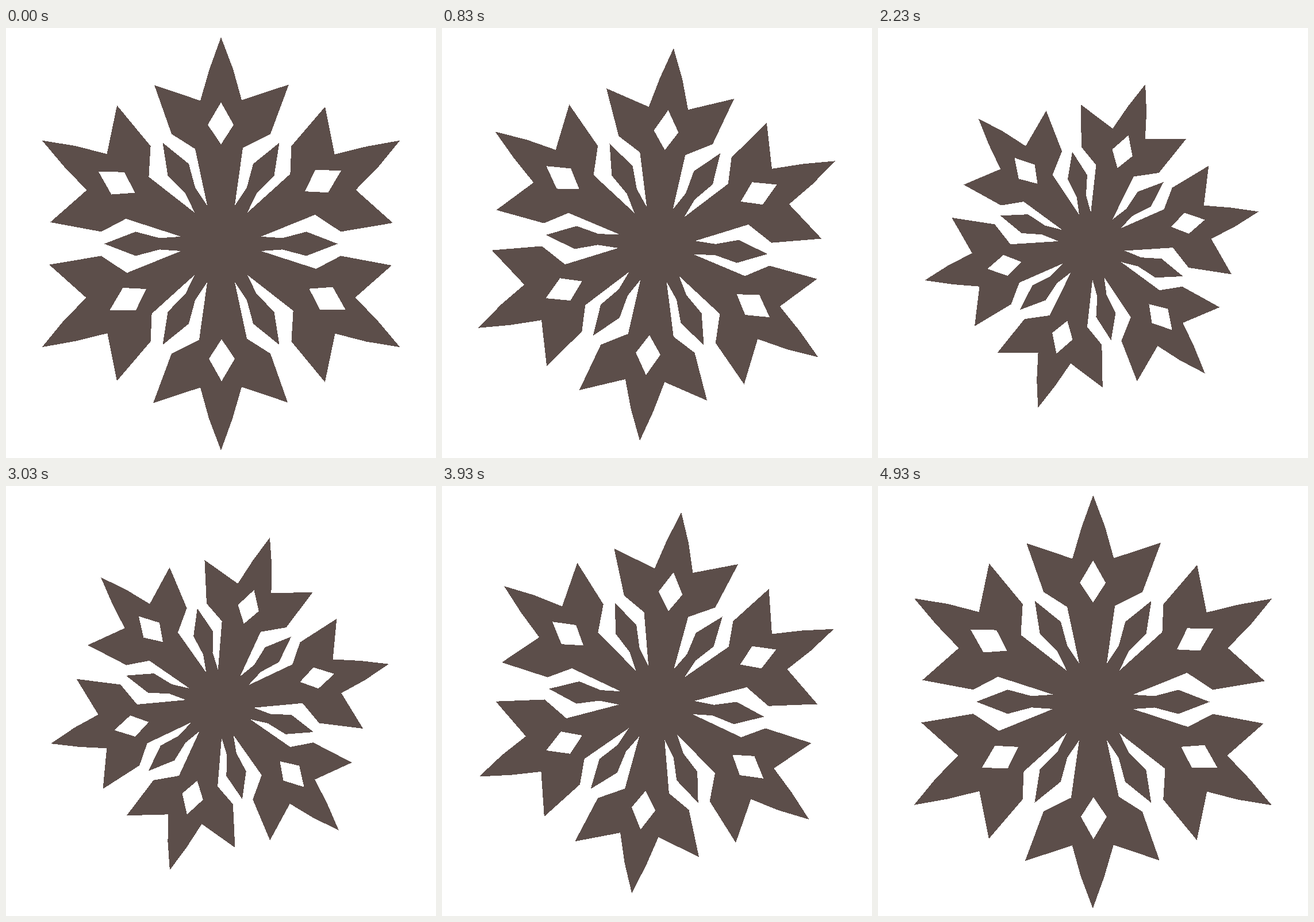
Write an HTML page that moves like this. It is 748 px wide and 748 px high and loops after 5.01 s.

```html
<!DOCTYPE html>
<html lang="en">
<head>
<meta charset="utf-8">
<title>Snowflake</title>
<style>
html, body { margin: 0; width: 100%; height: 100%; overflow: hidden; background: #fff; }
svg { display: block; width: 100%; height: 100%; }
</style>
</head>
<body>
<svg viewBox="0 0 748 748" shape-rendering="crispEdges">
  <g id="flake">
    <path id="body" fill="#5c4e4a"/>
    <path id="holes" fill="#fff"/>
  </g>
</svg>
<script>
const LOOP = 5010, CYCLE = 5000;
const TURN = 18.97, SHRINK = 0.181;
const CENTER = [374, 375.4], PIVOT = [361, 377.3];
const HUB = 70;
const el = id => document.getElementById(id);

// Points are [across, outward] from the centre, with the shape pointing up.
const arm = [
  [-21, 50], [-24, 67], [-45, 165], [-86, 191], [-116, 276], [-36, 249], [-20, 304], [0, 359.5],
  [21, 304], [36, 250], [118, 277], [86, 191], [38, 167], [24, 67], [21, 50]
];
const side = [[12.5, 55], [12.5, 70], [10, 107], [21, 148.5]];
const petal = [...side.map(([w, r]) => [-w, r]), [0, 203], ...side.slice().reverse()];
const kite = [[0, 245], [22, 206], [0, 172], [-23, 206]];
// The cut-outs sit slightly off the arm axes.
const nudge = [[0, 1], [-6, 0], [-9, 0], [-1, -6], [-3, -20], [2, 2]];

function polygon(points, degrees) {
  const a = degrees * Math.PI / 180, c = Math.cos(a), s = Math.sin(a);
  const place = ([w, r]) =>
    `${(CENTER[0] + w * c + r * s).toFixed(2)},${(CENTER[1] + w * s - r * c).toFixed(2)}`;
  return `M${points.map(place).join(" ")}Z`;
}

const [cx, cy] = CENTER;
let body = `M${cx - HUB} ${cy}a${HUB} ${HUB} 0 0 1 ${2 * HUB} 0a${HUB} ${HUB} 0 0 1 ${-2 * HUB} 0Z`;
let holes = "";
nudge.forEach(([dw, dr], k) => {
  body += polygon(arm, 60 * k) + polygon(petal, 60 * k + 30);
  holes += polygon(kite.map(([w, r]) => [w + dw, r + dr]), 60 * k);
});
el("body").setAttribute("d", body);
el("holes").setAttribute("d", holes);

// The motion advances in alternating short and long steps.
function stepTime(t) {
  const base = Math.floor(t / 100) * 100;
  return Math.min(t - base < 30 ? base : base + 100 / 3, 4900 + 100 / 3);
}

function render(ms) {
  const t = stepTime(ms % LOOP);
  const x = 1 - Math.abs(1 - t / (CYCLE / 2));
  const e = x * x * (3 - 2 * x);
  const [px, py] = PIVOT;
  el("flake").setAttribute("transform",
    `translate(${px} ${py}) rotate(${TURN * e}) scale(${1 - SHRINK * e}) translate(${-px} ${-py})`);
}

let start;
function tick(now) {
  if (start === undefined) start = now;
  render(Math.max(0, now - start));
  requestAnimationFrame(tick);
}
render(0);
requestAnimationFrame(tick);
</script>
</body>
</html>
```
